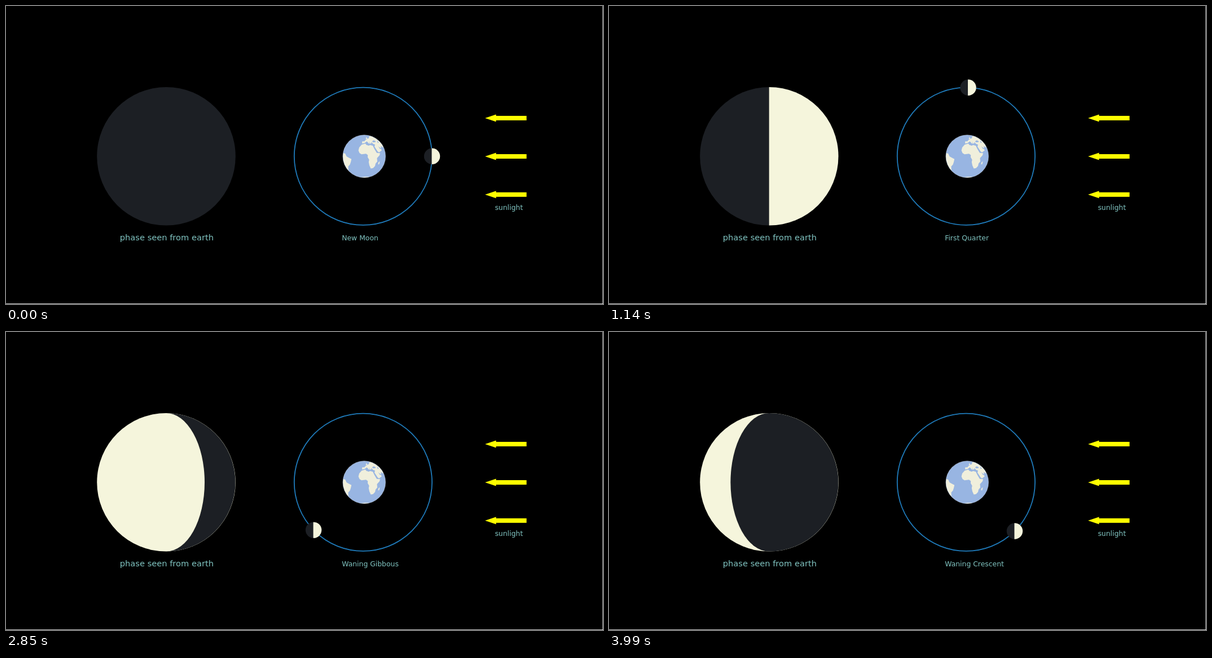
Write an HTML page that moves like this. It is 1058 px wide and 529 px high and loops after 4.56 s.

```html
<!DOCTYPE html>
<html lang="en">
<head>
<meta charset="utf-8">
<title>Moon phases</title>
<style>
  html, body { margin: 0; width: 100%; height: 100%; overflow: hidden; background: #fff; }
  svg { display: block; width: 1058px; height: 529px; }
  text { font: 12.4px "DejaVu Sans", sans-serif; fill: #80c4c1; }
  .caption { font-size: 14.65px; }
  .dark { fill: #1c1f24; }
  .lit { fill: #f5f5dc; }
  .land { fill: #f0efdc; }
  .step {
    visibility: hidden;
    animation: show 4.56s step-end infinite;
    animation-delay: calc(var(--i) * 0.57s - 4.56s);
  }
  @keyframes show {
    0% { visibility: visible; }
    12.5%, 100% { visibility: hidden; }
  }
</style>
</head>
<body>
<svg viewBox="0 0 1058 529">
  <defs>
    <clipPath id="globe"><circle cx="634.8" cy="266.8" r="37.8"/></clipPath>
    <path id="arrow" d="M849 0L868.5-6.5V-4H922.5V4H868.5V6.5Z" fill="#ff0"/>
  </defs>
  <rect width="1057.3" height="528.2"/>
  <circle cx="632.9" cy="266.8" r="122.1" fill="none" stroke="#1f7bbb" stroke-width="1.8"/>

  <g clip-path="url(#globe)">
    <circle cx="634.8" cy="266.8" r="38" fill="#98b5e2"/>
    <g class="land">
      <!-- Africa, Madagascar -->
      <path d="M630.5 246L637 244.2L638.5 246.5L643 248L645 246.8L650 248L653 254L657 260.8L663 261.2L662 265L657.5 270L658 276L655 279.5L654 284L650.5 287.7L646.5 288.5L644 283L642.8 277L643.6 273L641 268.5L641.2 264.5L638 262.2L630 263.2L626.5 261L624.6 256.5L626 251Z"/>
      <path d="M662.5 275.5L661.5 280.5L659.6 281.5L659.8 278Z"/>
      <!-- Europe and Asia -->
      <path d="M631 244L631.3 240.2L635.2 240.2L637 238L640.2 235.8L643 234.8L643.5 232L647 229L658 229L674 247L668 251L664 248.5L665 252.5L662 251L666 256L661 260L658.5 258L653 249.5L654 246L650 244.5L648 241.5L646.5 245L642.5 239.5L645 244L643.5 244.5L639.5 240.3L635.5 243.2Z"/>
      <path d="M637.5 236.5L638.5 232.5L640.5 235.5Z"/>
      <!-- South America, Antarctica -->
      <path d="M595 261L601 261.8L603.5 267L607 269L612.2 271.8L611 277L609.5 281.5L606.5 284.8L606.8 291L608 294L603 292L594 275Z"/>
      <path d="M629 304L636 303L643 303L641 306L630 306Z"/>
    </g>
    <path d="M648.5 240.2L652 238.2L656 241L651.5 242.2ZM658 238L660.5 242.5L658.5 243ZM659.5 248.5L664.5 253.5L662.5 253.5Z" fill="#98b5e2"/>
  </g>
  <circle cx="634.8" cy="266.8" r="37.8" fill="none" stroke="#c3d2e8" stroke-width=".6"/>

  <use href="#arrow" y="199"/>
  <use href="#arrow" y="266.9"/>
  <use href="#arrow" y="334.8"/>
  <text x="866.4" y="361.6">sunlight</text>
  <text class="caption" x="201.8" y="415.8">phase seen from earth</text>
  <g id="steps"></g>
</svg>
<script>
  const names = ["New Moon", "Waxing Crescent", "First Quarter", "Waxing Gibbous",
                 "Full Moon", "Waning Gibbous", "Third Quarter", "Waning Crescent"];
  const angles = [0, 42.9, 88.3, 133.7, 179, 224, 269.3, 314.8];
  const R = 122.8, cx = 284, cy = 266.8;

  // Right-hand part of the disc; the terminator moves left as n grows.
  function cover(n) {
    if (n === 0) return "";
    const x = cx - 0.3, rx = n === 2 ? 0 : 68.3;
    const edge = rx ? `A${rx} ${R} 0 0 ${n > 2 ? 1 : 0} ${x} ${cy - R}` : "";
    return `M${x} ${cy - R}A${R} ${R} 0 0 1 ${x} ${cy + R}${edge}Z`;
  }

  function orbiter(deg) {
    const a = deg * Math.PI / 180;
    const x = 632.9 + 122.1 * Math.cos(a), y = 266.8 - 122.1 * Math.sin(a);
    return `<g transform="translate(${x} ${y})"><circle class="dark" r="14.2"/>
      <path class="lit" d="M-.5-14.2H0A14.2 14.2 0 0 1 0 14.2H-.5Z"/></g>`;
  }

  document.getElementById("steps").innerHTML = names.map((name, i) => {
    const [base, top] = i < 4 ? ["dark", "lit"] : ["lit", "dark"];
    return `<g class="step" style="--i:${i}">
      <circle class="${base}" cx="${cx}" cy="${cy}" r="${R}"/>
      <path class="${top}" d="${cover(i % 4)}"/>
      ${orbiter(angles[i])}
      <text x="595.2" y="415.9">${name}</text></g>`;
  }).join("");
</script>
</body>
</html>
```
